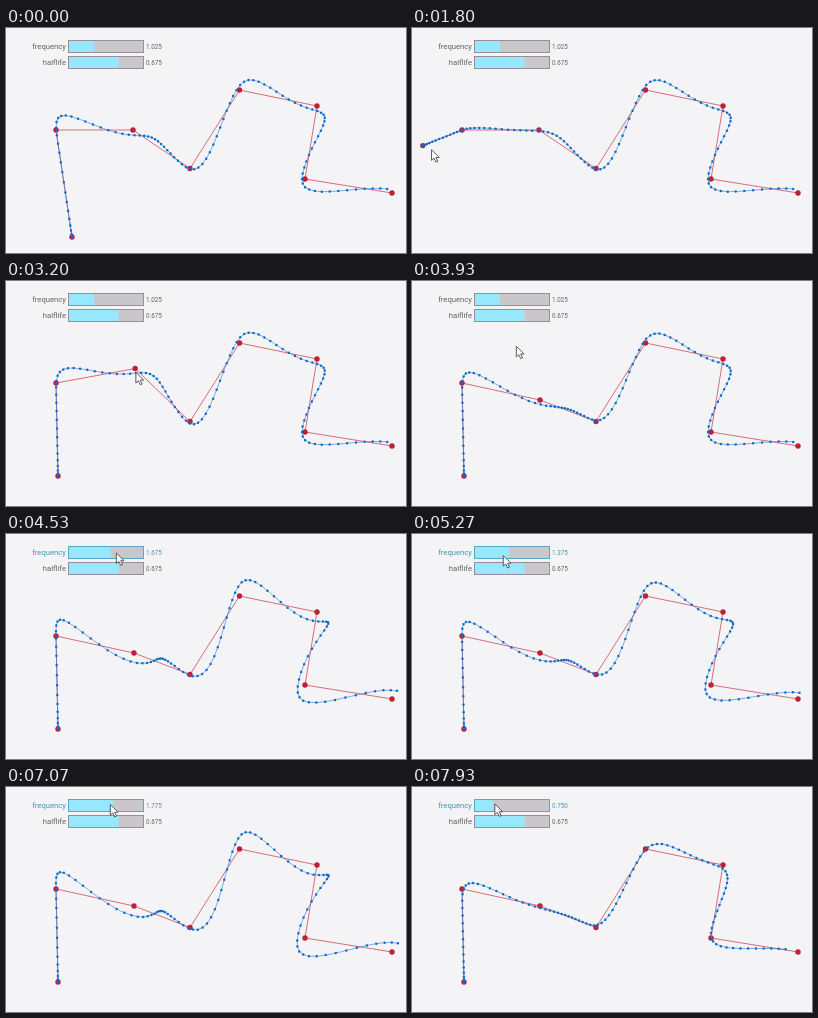
Animation, 400 px wide and 225 px high, one loop 8 s. Source, as an HTML page:

```html
<!DOCTYPE html>
<html lang="en">
<head>
<meta charset="utf-8">
<title>Spring curve</title>
<style>
  html, body { margin: 0; width: 100%; height: 100%; overflow: hidden; background: #f4f3f5; }
  svg { display: block; width: 100vw; height: 100vh; }
  text { font: 7.7px Roboto, sans-serif; fill: #626266; }
  .num { font-size: 6.3px; }
  .box { fill: #cac7ca; stroke: #939194; }
  .bar { fill: #97e8ff; }
  .active text { fill: #4a97ba; }
  .active .box { stroke: #55a8c6; }
</style>
</head>
<body>
<svg viewBox="0 0 400 225">
  <g id="freq">
    <text x="60" y="21" text-anchor="end">frequency</text>
    <rect class="box" x="62.5" y="12.5" width="75" height="12"/>
    <rect class="bar" id="bar" x="63" y="13" width="25" height="11"/>
    <text class="num" id="num" x="140" y="21">1.025</text>
  </g>
  <g>
    <text x="60" y="36.7" text-anchor="end">halflife</text>
    <rect class="box" x="62.5" y="28.5" width="75" height="12"/>
    <rect class="bar" x="63" y="29" width="49.5" height="11"/>
    <text class="num" x="140" y="36.7">0.675</text>
  </g>
  <path id="poly" fill="none" stroke="#cb4052" stroke-width=".75"/>
  <path id="knobs" fill="none" stroke="#be2137" stroke-width="5.4" stroke-linecap="round"/>
  <path id="curve" fill="none" stroke="#2b7fd6" stroke-width=".6"/>
  <path id="dots" fill="none" stroke="#0f6acb" stroke-width="2.5" stroke-linecap="round"/>
  <path id="cursor" d="M0 0V10.6L2.5 8.4L4.4 12.4L6.2 11.6L4.4 7.7H7.8Z" fill="#fff" stroke="#4a4a4e" stroke-width=".9" stroke-linejoin="round"/>
</svg>
<script>
const LOOP = 8000, DOTS = 100, LAG = 100;
const OMEGA = 4.6;          // spring rate, per segment of the polyline
const DAMPING = 0.3267;     // damping ratio times frequency
const LEAD = 0.035;         // goal runs half a sample ahead
const $ = id => document.getElementById(id);
const clamp = (v, a, b) => Math.min(b, Math.max(a, v));

const corner = [50, 102];
const tail = [[184, 140.5], [233.5, 62], [311, 78], [299, 151], [386, 165]];

// Mouse path: drag the first point, then the third, then swing the slider
const SHOW = 930, DROP_A = 2500, GRAB_B = 2750, DROP_B = 3700, SLIDE = 4140;
const mouse = [
  [SHOW, 66, 209], [1620, 8, 116.5], [1980, 36, 136], [2400, 52, 195], [DROP_A, 52, 195],
  [GRAB_B, 127, 102], [3050, 129, 87], [DROP_B, 128, 119],
  [SLIDE, 87.6, 19], [4630, 113, 19], [5900, 70.1, 24], [6900, 106.6, 18], [7830, 80.8, 17], [LOOP, 84, 17]
];

// Smooth path through the keys that rests at turning points
function mouseAt(time) {
  const t = clamp(time, SHOW, LOOP);
  let i = 0;
  while (i < mouse.length - 2 && mouse[i + 1][0] < t) i++;
  const a = mouse[i], b = mouse[i + 1], h = b[0] - a[0];
  const u = (t - a[0]) / h, v = 1 - u;
  const slope = (j, c) => {
    const p = mouse[j - 1], q = mouse[j], r = mouse[j + 1];
    if (!p || !r || (q[c] - p[c]) * (r[c] - q[c]) <= 0) return 0;
    return (r[c] - p[c]) / (r[0] - p[0]);
  };
  return [1, 2].map(c => a[c] * v * v * (1 + 2 * u) + b[c] * u * u * (3 - 2 * u)
    + h * u * v * (slope(i, c) * v - slope(i + 1, c) * u));
}

// Response of a damped spring, at rest at first, to a goal that moves at unit speed
function rampResponse(freq) {
  const zeta = Math.min(0.999, DAMPING / freq);
  const decay = zeta * OMEGA, w = OMEGA * Math.sqrt(1 - zeta * zeta), delay = 2 * zeta / OMEGA;
  return t => t <= 0 ? 0 : t - delay
    + Math.exp(-decay * t) * (delay * Math.cos(w * t) - (1 - decay * delay) / w * Math.sin(w * t));
}

// Each corner of the polyline adds a ramp for its change in velocity
function springCurve(ctrl, freq) {
  const ramp = rampResponse(freq), segments = ctrl.length - 1;
  const speed = (i, c) => i < 0 ? 0 : ctrl[i + 1][c] - ctrl[i][c];
  const out = [];
  for (let k = 0; k <= DOTS; k++) {
    const t = k / DOTS * (segments + LEAD);
    out.push([0, 1].map(c => {
      let x = ctrl[0][c];
      for (let i = 0; i < segments; i++) x += (speed(i, c) - speed(i - 1, c)) * ramp(t - i);
      return x;
    }));
  }
  return out;
}

const fmt = p => p[0].toFixed(2) + " " + p[1].toFixed(2);
const line = pts => "M" + pts.map(fmt).join("L");
const spots = pts => pts.map(p => "M" + fmt(p) + "h.01").join("");

function draw(t) {
  const held = (from, to) => mouseAt(clamp(t - LAG, from, to));
  const ctrl = [held(0, DROP_A), corner, held(GRAB_B, DROP_B), ...tail];
  const freq = Math.round((held(SLIDE, LOOP)[0] - 62) / 25 * 40) / 40;
  const path = springCurve(ctrl, freq);
  $("poly").setAttribute("d", line(ctrl));
  $("knobs").setAttribute("d", spots(ctrl));
  $("curve").setAttribute("d", line(path));
  $("dots").setAttribute("d", spots(path));
  $("bar").setAttribute("width", (freq * 25 - .5).toFixed(2));
  $("num").textContent = freq.toFixed(3);
  $("freq").setAttribute("class", t > SLIDE - LAG ? "active" : "");
  $("cursor").setAttribute("transform", `translate(${fmt(mouseAt(t))})`);
  $("cursor").setAttribute("visibility", t < SHOW ? "hidden" : "visible");
}

const start = performance.now();
function tick() {
  draw((performance.now() - start) % LOOP);
  requestAnimationFrame(tick);
}
tick();
</script>
</body>
</html>
```
